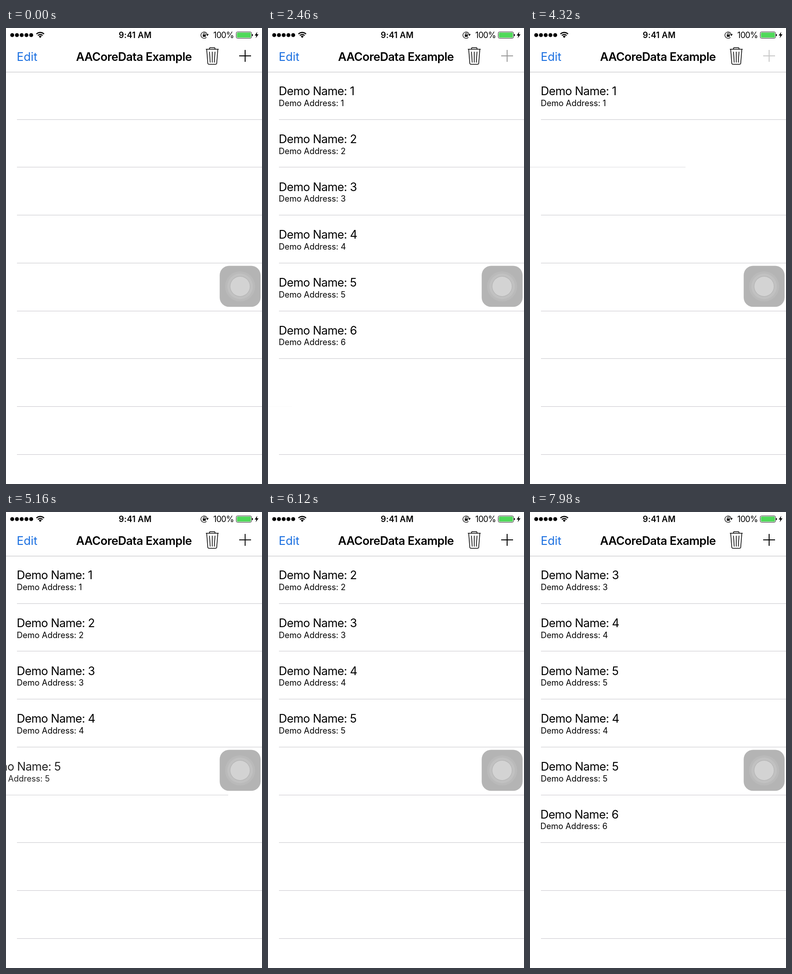
An HTML page with a canvas that plays this animation: 561 by 998 pixels, repeating every 8 s.

```html
<!DOCTYPE html>
<html lang="en">
<head>
<meta charset="utf-8">
<title>AACoreData Example</title>
<style>
  html, body { margin: 0; width: 100%; height: 100%; overflow: hidden; background: #fff; }
  canvas { display: block; }
</style>
</head>
<body>
<canvas id="stage" width="561" height="998"></canvas>
<script>
const ctx = document.getElementById('stage').getContext('2d');
const WIDTH = 561, HEIGHT = 998, LOOP = 8000, STEP = 60;
const TABLE_TOP = 95.74, ROW = 104.72, SLIDE = 180;
const SEPARATOR = '#c8c7cc';

// Taps on the plus button, on the trash can and on the first row.
const events = [];
function addTaps(start, firstNumber, count) {
  for (let i = 0; i < count; i++) {
    events.push({ at: start + i * 268, type: 'add', n: firstNumber + i });
  }
}
addTaps(818, 1, 9);
events.push({ at: 3550, type: 'clear' });
addTaps(3949, 1, 5);
events.push({ at: 5860, type: 'remove' }, { at: 6722, type: 'remove' });
addTaps(7268, 4, 3);

const clamp = x => Math.min(1, Math.max(0, x));
const ease = x => { x = clamp(x); return x * x * (3 - 2 * x); };

function tableAt(t) {
  let rows = [], removed = null;
  for (const e of events) {
    if (e.at > t) break;
    if (e.type === 'add') rows.push({ n: e.n, born: e.at });
    else if (e.type === 'clear') rows = [];
    else removed = { n: rows.shift().n, at: e.at };
  }
  return { rows, removed };
}

// Dimmed while held, then fading back after release.
function buttonAlpha(t, type) {
  let alpha = 1;
  for (const e of events) {
    if (e.type !== type || t < e.at - 165) continue;
    alpha = t < e.at ? 0.22 : 0.22 + 0.78 * clamp((t - e.at) / 150);
  }
  return alpha;
}

function text(str, x, y, size, { weight = 400, color = '#000', spacing = 0, align = 'left' } = {}) {
  ctx.font = `${weight} ${size}px Inter, sans-serif`;
  ctx.letterSpacing = spacing + 'px';
  ctx.textAlign = align;
  ctx.fillStyle = color;
  ctx.fillText(str, x, y);
}

function disc(x, y, r, color) {
  ctx.fillStyle = color;
  ctx.beginPath();
  ctx.arc(x, y, r, 0, 2 * Math.PI);
  ctx.fill();
}

function roundBox(x, y, w, h, r, color) {
  ctx.fillStyle = color;
  ctx.beginPath();
  ctx.roundRect(x, y, w, h, r);
  ctx.fill();
}

function stroke(path, width, color = '#000') {
  ctx.lineWidth = width;
  ctx.strokeStyle = color;
  ctx.stroke(new Path2D(path));
}

function fill(path, color = '#000') {
  ctx.fillStyle = color;
  ctx.fill(new Path2D(path));
}

function separator(bottom, dx = 0) {
  ctx.fillStyle = SEPARATOR;
  ctx.fillRect(24 + dx, Math.round(bottom - 0.75), WIDTH - 24, 1);
}

function drawRow(n, top, shown) {
  const dx = -WIDTH * (1 - shown);
  ctx.globalAlpha = shown;
  ctx.fillStyle = '#fff';
  ctx.fillRect(dx, top + 1, WIDTH, ROW - 1);
  text('Demo Name: ' + n, 23.5 + dx, top + 51.4, 25.4, { spacing: -0.6 });
  text('Demo Address: ' + n, 23.5 + dx, top + 75.1, 18);
  separator(top + ROW, dx);
  ctx.globalAlpha = 1;
}

function drawTable(t) {
  const { rows, removed } = tableAt(t);
  for (let i = rows.length; i < 9; i++) separator(TABLE_TOP + ROW * (i + 1));
  let shift = 0;
  if (removed && t < removed.at + SLIDE) {
    const progress = ease((t - removed.at) / SLIDE);
    shift = ROW * (1 - progress);
    drawRow(removed.n, TABLE_TOP, 1 - progress);
  }
  rows.forEach((row, i) =>
    drawRow(row.n, TABLE_TOP + ROW * i + shift, ease((t - row.born) / SLIDE)));
}

function drawStatusBar() {
  for (let i = 0; i < 5; i++) disc(13.6 + 10.4 * i, 15.5, 4.3, '#000');

  for (const r of [11.8, 7.3]) {
    ctx.beginPath();
    ctx.arc(75, 21.5, r, -Math.PI * 0.75, -Math.PI * 0.25);
    ctx.lineWidth = 2.5;
    ctx.strokeStyle = '#000';
    ctx.stroke();
  }
  fill('M75 21.8 L71.8 18.4 A4.5 4.5 0 0 1 78.2 18.4 Z');

  text('9:41 AM', 283, 21.6, 18, { weight: 600, align: 'center', spacing: 0.2 });

  // Rotation lock
  stroke('M439.3 20.4 A7 7 0 1 1 441 14.5', 1.3);
  fill('M438.2 13.6 H444.4 L441.3 17.4 Z M431.3 14.6 H437.7 V19.3 H431.3 Z');
  stroke('M432.4 15 V13 A1.9 1.9 0 0 1 436.4 13 V15', 1.2);

  text('100%', 499.2, 21.8, 18, { align: 'right', spacing: -0.7 });

  // Battery
  roundBox(506, 10, 30.5, 11, 1.5, '#4fd859');
  ctx.beginPath();
  ctx.roundRect(504.5, 8.5, 33.5, 14, 2.8);
  ctx.lineWidth = 1;
  ctx.strokeStyle = '#222';
  ctx.stroke();
  fill('M539 13 Q541.2 13.4 541.2 15.5 Q541.2 17.6 539 18 Z');
  fill('M550.6 8.2 L545 16.4 H548.6 L547.2 22.3 L553.4 13.8 H549.6 Z');
}

function drawNavBar(t) {
  ctx.fillStyle = '#bcbcbf';
  ctx.fillRect(0, 96, WIDTH, 1);
  text('Edit', 23.5, 72, 25.4, { color: '#1a6fe0' });
  text('AACoreData Example', 153.4, 72, 25.4, { weight: 600, spacing: -0.5 });

  ctx.lineJoin = ctx.lineCap = 'round';
  ctx.globalAlpha = buttonAlpha(t, 'clear');
  stroke('M438.5 46.5 H465.5' +
    'M446 46.5 V44.5 Q446 43 447.5 43 H456.5 Q458 43 458 44.5 V46.5' +
    'M439.8 46.5 L442.2 77 Q442.5 79.5 445 79.5 H459 Q461.5 79.5 461.8 77 L464.2 46.5', 1.5);
  stroke('M446 52.5 L447.5 75 M452 52.5 V75 M458 52.5 L456.5 75', 1.5);
  ctx.lineCap = 'butt';

  ctx.globalAlpha = buttonAlpha(t, 'add');
  stroke('M511 61 H537 M524 48 V74', 2);
  ctx.globalAlpha = 1;
}

function drawTouchButton() {
  roundBox(468.3, 520.5, 89.6, 89.8, 20.5, '#b4b4b4');
  disc(513, 565.5, 33, '#bababa');
  disc(513, 565.5, 28, '#c1c1c1');
  disc(513, 565.5, 22.4, '#b2b2b2');
  disc(513, 565.5, 21.4, '#d3d3d3');
}

function draw(now) {
  const t = Math.floor((now % LOOP) / STEP) * STEP;
  ctx.fillStyle = '#fff';
  ctx.fillRect(0, 0, WIDTH, HEIGHT);
  drawTable(t);
  drawStatusBar();
  drawNavBar(t);
  drawTouchButton();
}

const start = performance.now();
function frame() {
  draw(performance.now() - start);
  requestAnimationFrame(frame);
}
frame();
</script>
</body>
</html>
```
